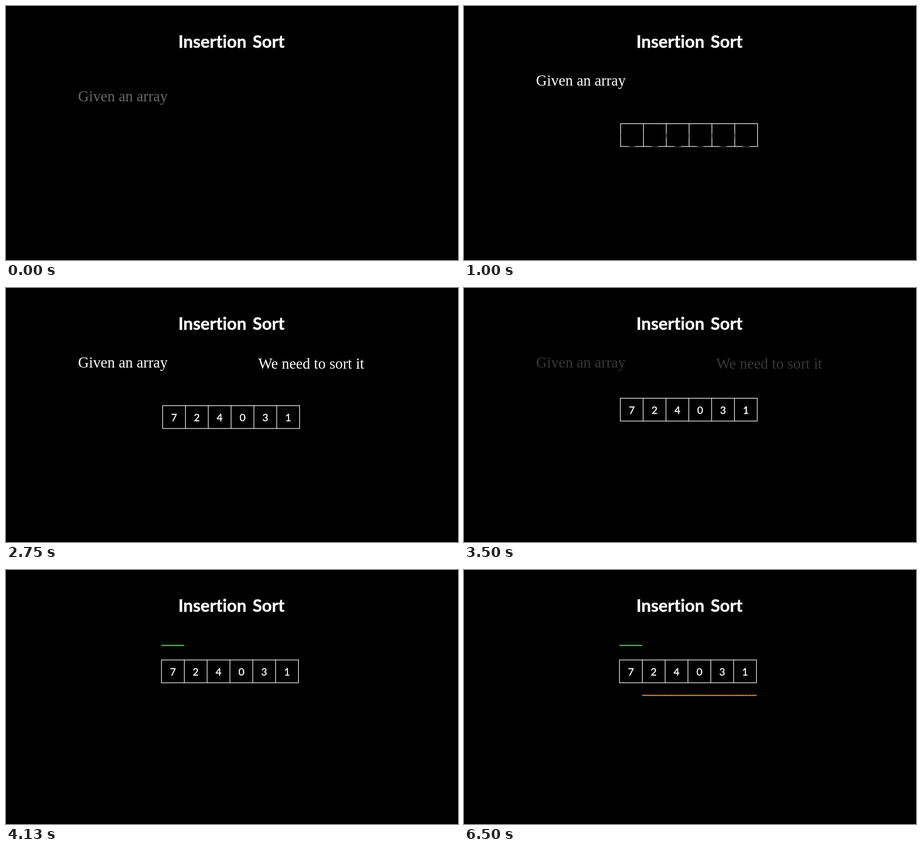
An HTML page with a canvas for the animation above (8 s loop, 800 px wide and 450 px high).

```html
<!DOCTYPE html>
<html lang="en">
<head>
<meta charset="utf-8">
<title>Insertion Sort</title>
<style>
  html, body { margin: 0; width: 100%; height: 100%; overflow: hidden; background: #000; }
  canvas { display: block; width: 800px; height: 450px; }
</style>
</head>
<body>
<canvas id="stage" width="800" height="450"></canvas>
<script>
const ctx = document.getElementById('stage').getContext('2d');

const LOOP = 8000;
const STEP = 125; // the picture advances eight times a second
const CELL = 40.4;
const VALUES = [7, 2, 4, 0, 3, 1];
const SANS = 'Lato, sans-serif';
const SERIF = '"Liberation Serif", serif';

const ramp = (t, from, to) => Math.min(1, Math.max(0, (t - from) / (to - from)));
const smooth = p => p * p * (3 - 2 * p);
const lerp = (a, b, p) => a + (b - a) * p;

// A faint outline of the given width makes the letters a little heavier.
function text(str, x, y, font, align = 'left', outline = 0) {
  ctx.font = font;
  ctx.textAlign = align;
  ctx.fillStyle = ctx.strokeStyle = '#fff';
  ctx.fillText(str, x, y);
  if (outline) {
    ctx.lineWidth = outline;
    ctx.strokeText(str, x, y);
  }
}

// Places the left edge of the ink, not the pen, at x.
function titleWord(str, x) {
  ctx.font = '700 30.4px ' + SANS;
  ctx.textAlign = 'left';
  ctx.letterSpacing = '0.01px'; // any spacing turns ligatures off
  text(str, x + ctx.measureText(str).actualBoundingBoxLeft, 74.2, ctx.font, 'left', 0.4);
  ctx.letterSpacing = '0px';
}

function line(x1, x2, y, color, dash = []) {
  if (x2 <= x1) return;
  ctx.strokeStyle = color;
  ctx.lineWidth = 2.2;
  ctx.setLineDash(dash);
  ctx.beginPath();
  ctx.moveTo(x1, y);
  ctx.lineTo(x2, y);
  ctx.stroke();
  ctx.setLineDash([]);
}

function floatText(str, x, y, enter, leave) {
  ctx.globalAlpha = enter * (1 - leave);
  text(str, x, y + 47 * (1 - enter), '26.67px ' + SERIF);
  ctx.globalAlpha = 1;
}

function drawArray(x, y) {
  ctx.strokeStyle = '#fff';
  ctx.lineWidth = 1.15;
  ctx.strokeRect(x, y, CELL * VALUES.length, CELL);
  ctx.beginPath();
  for (let i = 1; i < VALUES.length; i++) {
    ctx.moveTo(x + i * CELL, y);
    ctx.lineTo(x + i * CELL, y + CELL);
  }
  ctx.stroke();
  VALUES.forEach((v, i) =>
    text(v, x + (i + 0.5) * CELL, y + 27.3, '18px ' + SANS, 'center', 0.4));
}

// Each cell is uncovered from its corners inwards by a shrinking disc.
function coverCells(x, y, p) {
  const r = 27.3 * (1 - Math.pow(p, 1.17));
  if (r <= 0) return;
  ctx.fillStyle = '#000';
  VALUES.forEach((v, i) => {
    ctx.save();
    ctx.beginPath();
    ctx.rect(x + i * CELL - (i ? 0 : 2), y - 2, CELL + 2, CELL + 4);
    ctx.clip();
    ctx.beginPath();
    ctx.arc(x + (i + 0.5) * CELL, y + CELL / 2 + 1.1, r, 0, Math.PI * 2);
    ctx.fill();
    ctx.restore();
  });
}

function draw(t) {
  ctx.fillStyle = '#000';
  ctx.fillRect(0, 0, 800, 450);

  titleWord('Insertion', 307);
  titleWord('Sort', 436.4);

  const leave = ramp(t, 3400, 3528);
  floatText('Given an array', 127.6, 141.3, ramp(t, -175, 250), leave);
  floatText('We need to sort it', 446.6, 142.6, ramp(t, 2294, 2750), leave);

  if (t >= 750) {
    const move = t < 3500 ? 0 : smooth(ramp(t, 3330, 3830));
    const x = lerp(277.2, 275.2, move);
    const y = lerp(208.5, 159.4, move);
    drawArray(x, y);
    coverCells(x, y, ramp(t, 750, 1500));
  }

  line(275, lerp(275, 315.5, ramp(t, 3750, 4125)), 133.7, '#46b45e');
  line(315.5, lerp(315.5, 518, ramp(t, 5875, 6500)), 222.2, '#f08a48', [2, 0.4]);
}

let start;
function frame(now) {
  if (start === undefined) start = now;
  const t = (now - start) % LOOP;
  draw(Math.floor(t / STEP) * STEP);
  requestAnimationFrame(frame);
}
requestAnimationFrame(frame);
</script>
</body>
</html>
```
